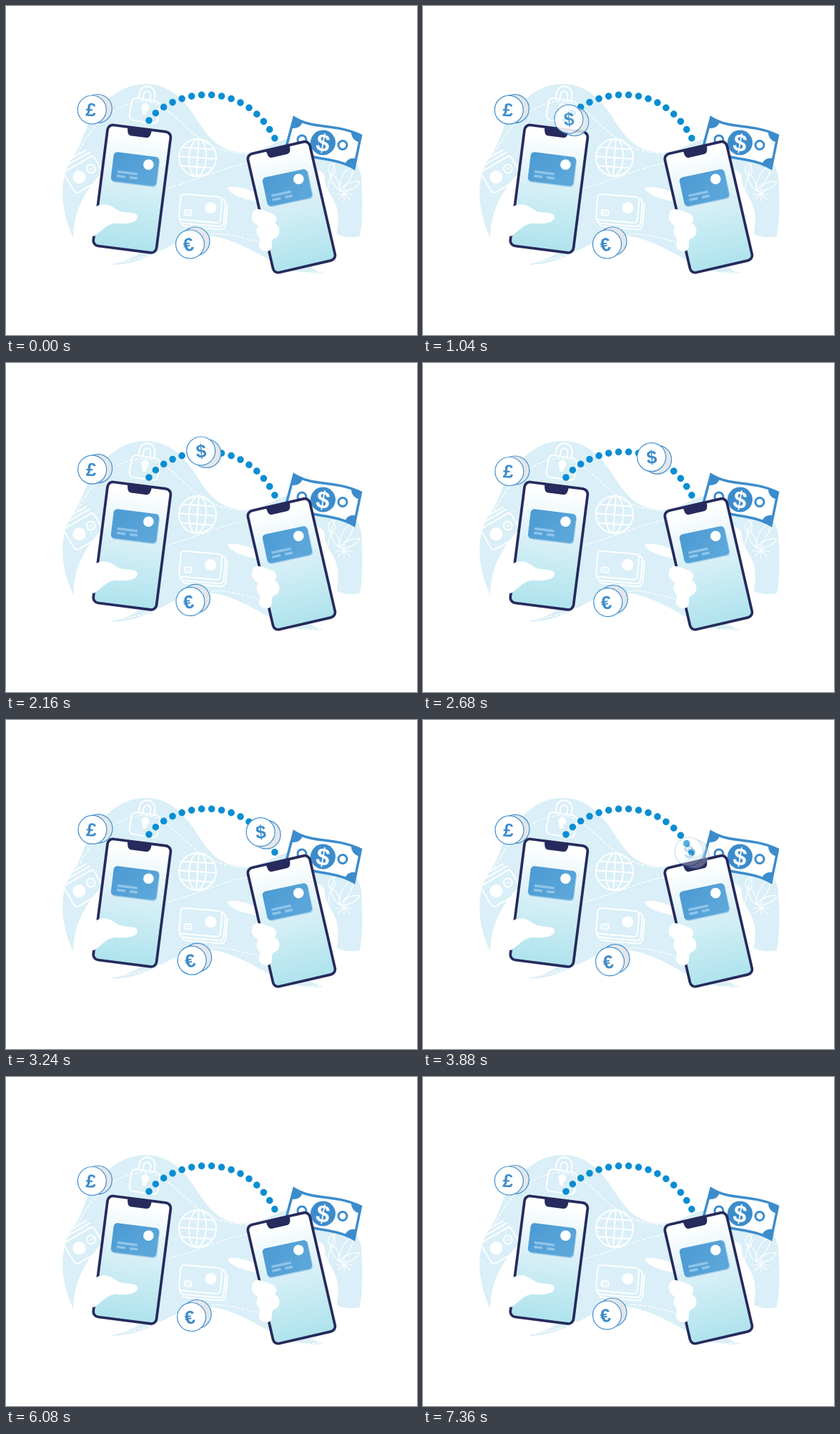
These frames come from a looping animation (575 by 460 pixels, 8000 ms). An HTML page:

```html
<!DOCTYPE html>
<html lang="en">
<head>
<meta charset="utf-8">
<title>Money transfer</title>
<style>
  html, body { margin: 0; width: 100%; height: 100%; overflow: hidden; background: #fff; }
  svg { display: block; width: 100vw; height: 100vh; }
  text { font: bold 26px "Liberation Sans", Arial, sans-serif; text-anchor: middle; fill: #3c8ccc; }
  .line { fill: none; stroke: #fff; stroke-width: 2; stroke-linecap: round; stroke-linejoin: round; }
  .thin { stroke-width: 1.2; }
  .dash { stroke-width: 1.2; stroke-dasharray: 4 3; }
  .coin circle { stroke: #3f8fd0; stroke-width: 1.2; }
</style>
</head>
<body>
<svg viewBox="0 0 575 460">
  <defs>
    <linearGradient id="screen" x2="0" y2="1">
      <stop offset=".05" stop-color="#fff"/><stop offset=".45" stop-color="#d9f0f7"/><stop offset="1" stop-color="#aee3ed"/>
    </linearGradient>
    <linearGradient id="card" y2=".6">
      <stop stop-color="#4b9ad3"/><stop offset="1" stop-color="#5ca7da"/>
    </linearGradient>
    <clipPath id="blobClip"><use href="#blob"/></clipPath>
    <g id="phone">
      <rect x="-44.5" y="-85.2" width="89" height="170.4" rx="7.500" fill="url(#screen)" stroke="#262a5c" stroke-width="3.700"/>
      <path d="M-17-85H17C16.500-77 15-73.500 10-73.500H-10C-15-73.500-16.500-77-17-85Z" fill="#262a5c"/>
    </g>
    <g id="bankCard">
      <rect x="-31" y="-19" width="64" height="41" rx="5" fill="#a9d0ec"/>
      <rect x="-32" y="-20.5" width="64" height="41" rx="5" fill="url(#card)"/>
      <circle cx="18" cy="-8.5" r="7.3" fill="#fff"/>
      <path d="M-24 6.5H4M-24 12.5h12m6 0h11" stroke="#8fc4e8" stroke-width="3.5"/>
    </g>
  </defs>

  <path id="blob" fill="#daeff7" d="M95 326C75 285 74 240 92 214C110 190 108 168 130 144
    C150 120 172 109 195 109C228 109 248 130 264 154C285 187 300 205 335 205C360 204 378 188 400 184
    C445 180 492 205 497 238C499 270 499 300 495 322C484 324 472 324 462 318L405 350Q425 368 444 373
    C425 375 402 373 380 361C345 343 310 319 272 321C232 325 205 360 150 362L125 325Z"/>

  <g class="line" clip-path="url(#blobClip)">
    <path class="dash" d="M100 207C120 165 150 138 190 133C245 135 255 208 340 206M227 254C270 243 300 226 342 219M288 319C310 317 330 325 352 329M150 359C180 356 200 349 215 342M400 371Q425 374 444 371"/>
    <g transform="translate(194 146) rotate(9)">
      <rect x="-20" y="-15" width="40" height="31" rx="6"/>
      <path d="M-11-15v-8a11 11 0 0 1 22 0v8M-5-15v-7a5 5 0 0 1 10 0v7"/>
      <path d="M-1.5 5L-2.5-1a4.5 4.5 0 1 1 5 0L1.5 5Z" fill="#fff"/>
    </g>
    <g transform="translate(268 212) rotate(4)">
      <circle r="26"/><ellipse rx="12" ry="26"/>
      <path d="M-26 0H26M0-26V26M-22-13H22M-22 13H22"/>
    </g>
    <g transform="translate(273 285) rotate(5)">
      <rect x="-30" y="-20" width="58" height="36" rx="5"/>
      <path d="M-29 15Q-28 21-22 21H27Q33 21 33 14V-13Q32-17 28-18M-24 23Q-22 25-18 25H30Q36 24 36 17V-11"/>
      <rect x="-23" y="2" width="10" height="7" rx="2"/><path class="thin" d="M-22 5.5h6"/>
      <circle cx="13" cy="-4" r="7" fill="#fff"/>
    </g>
    <g transform="translate(104 236) rotate(-30)">
      <path d="M-20-15H25Q29-15 29-10V14Q29 20 23 20H-13Q-19 20-19 14V-15M-17-21H27M-13-26H24"/>
      <circle cx="-3" cy="2" r="8" fill="#fff"/><circle cx="17" cy="0" r="6"/><path class="thin" d="M14 0h6"/>
    </g>
    <path class="thin" d="M448 273C451 245 457 225 463 214M456 238C449 233 449 224 457 220C462 228 461 234 456 238M466 258C455 249 454 239 454 234C464 239 467 248 466 258C467 240 474 228 486 223C487 238 477 249 466 258C476 247 488 244 495 246C489 256 478 260 466 258"/>
    <path class="thin" d="M473 253V273M462 263H485M466 256L481 270M481 256L465 270"/>
  </g>

  <g fill="#fff">
    <path d="M94 328C94 295 103 268 131 236L190 344Q175 355 148 361L125 345Z"/>
    <path d="M310 254C320 250 338 256 350 261V273C332 270 313 264 310 254Z"/>
    <path d="M432 228Q447 231 446 243C446 257 461 268 464 288Q466 306 462 322L440 330Z"/>
  </g>

  <g stroke="#3c8ccc" stroke-width="3.500">
    <path fill="#fff" d="M403 156C430 173 463 164 496.500 181L487 227C460 211 432 216 391 201Z"/>
    <g stroke="none" fill="#3c8ccc">
      <path d="M402 154L415 162Q412 172 399 171ZM498 180L483 174Q482 187 495 191ZM487 228L474 222Q477 211 491 213Z"/>
      <circle cx="443.500" cy="191" r="17.500"/>
    </g>
    <g fill="none" stroke-width="3"><circle cx="414" cy="187" r="6"/><circle cx="471" cy="194.500" r="6"/></g>
  </g>
  <text transform="translate(441.500 203) rotate(10)" style="font-size:34px;fill:#fff">$</text>

  <use href="#phone" transform="translate(176.300 255.700) rotate(7.300)"/>
  <use href="#bankCard" transform="translate(180.500 228) rotate(7)"/>
  <use href="#phone" transform="translate(399.400 281.200) rotate(-13)"/>
  <use href="#bankCard" transform="translate(393.500 254) rotate(-12)"/>

  <g fill="#fff">
    <path d="M112 292C122 280 132 276 142 278C151 280 154 286 163 288C174 289 185 289 184 296C182 304 166 305 156 304C141 303 136 314 123 322L108 318Z"/>
    <path d="M345 289C348 281 358 284 369 289C378 291 381 298 376 304C384 307 385 321 377 324C371 326 372 331 372 336C371 346 357 345 354 336C353 331 357 328 354 323C349 318 350 312 353 307C345 304 342 297 345 289Z"/>
  </g>

  <path d="M200 160C229 120 330 96 376 185" pathLength="15.01" fill="none" stroke="#0a8ed2"
    stroke-width="9.600" stroke-linecap="round" stroke-dasharray="0 1"/>

  <g class="coin" id="pound"><circle cx="8" cy="-1.500" r="20" fill="#e4e6ea"/><circle r="20" fill="#fff"/><text transform="translate(-2 9) rotate(4)">£</text></g>
  <g class="coin" id="euro"><circle cx="7.500" cy="-4" r="20" fill="#e4e6ea"/><circle r="20" fill="#fff"/><text transform="translate(-1 9.500) rotate(-10)">€</text></g>
  <g class="coin" id="dollar"><circle cx="8" cy="3.500" r="20" fill="#e4e6ea"/><circle r="20" fill="#fff"/><text transform="translate(1 9) rotate(-5)">$</text></g>
</svg>
<script>
  const [pound, euro, dollar] = ["pound", "euro", "dollar"].map(id => document.getElementById(id));
  const progress = (t, from, to) => Math.min(1, Math.max(0, (t - from) / (to - from)));
  const ease = u => (1 - Math.cos(Math.PI * u)) / 2;
  const bob = (t, from, peak, to) => ease(progress(t, from, peak)) - ease(progress(t, peak, to));
  const bezier = (s, a, b, c, d) =>
    a * (1 - s) ** 3 + 3 * b * s * (1 - s) ** 2 + 3 * c * s * s * (1 - s) + d * s ** 3;
  const place = (coin, x, y) => coin.setAttribute("transform", `translate(${x} ${y})`);

  function draw(now) {
    const t = Math.floor(now % 8000 / 40) * 40;
    const p = bob(t, 800, 3700, 6500);
    place(pound, 120.3 + p * 0.7, 145 + p * 9);
    const e = bob(t, 1600, 4640, 7360);
    place(euro, 257.5 + e * 4.7, 333 + e * 5.5);

    const u = progress(t, 780, 3840);
    const s = (u + ease(u)) / 2;
    place(dollar, bezier(s, 199, 226, 348, 372), bezier(s, 168, 100, 112, 184));
    dollar.setAttribute("opacity", progress(t, 780, 1080) * (1 - progress(t, 3600, 4000)));
    requestAnimationFrame(draw);
  }
  draw(0);
</script>
</body>
</html>
```
